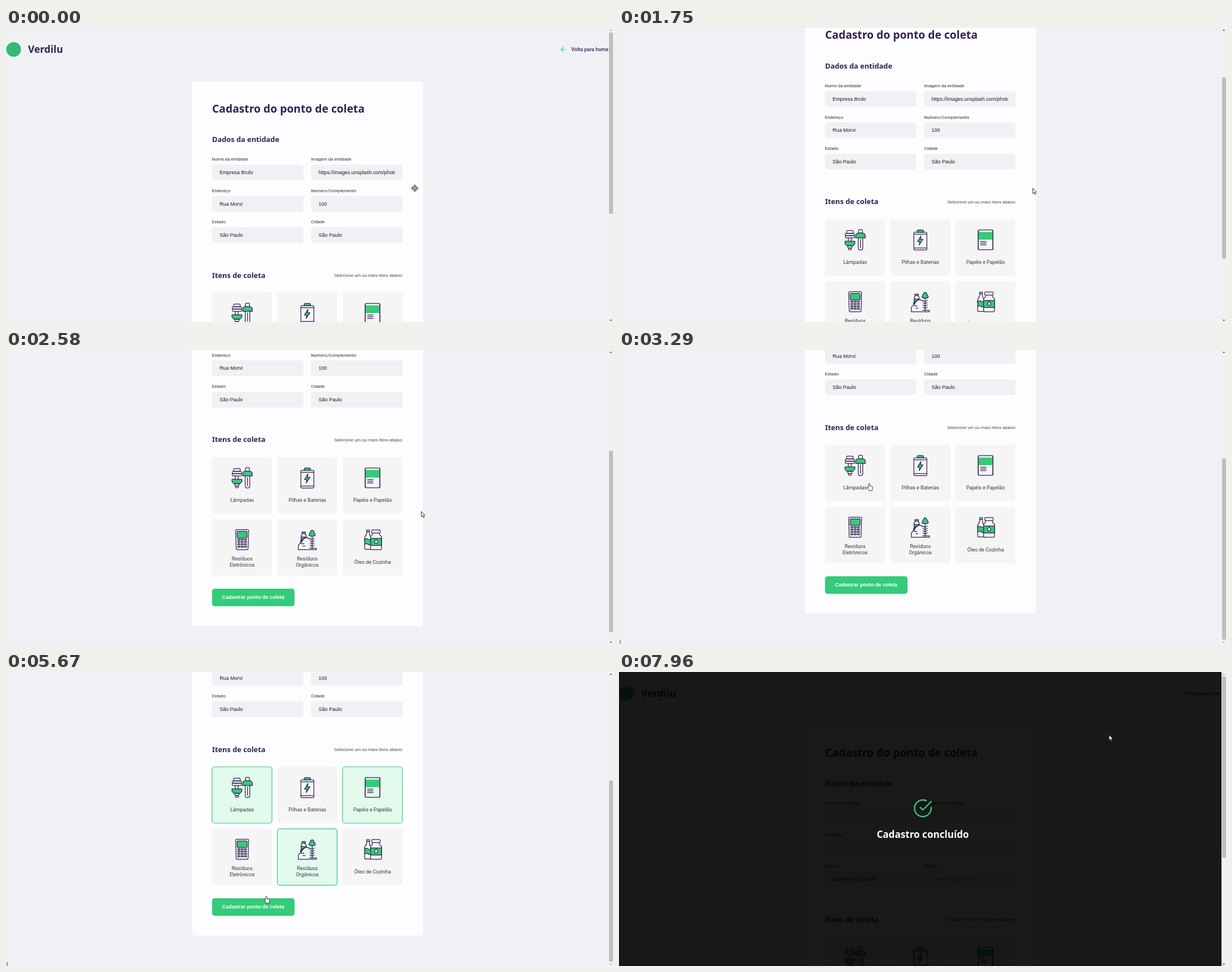
These frames come from a looping animation (1075 by 521 pixels, 8000 ms). An HTML page:

```html
<!DOCTYPE html>
<html lang="pt-BR">
<head>
<meta charset="utf-8">
<title>Cadastro do ponto de coleta</title>
<style>
html, body { margin: 0; height: 100%; overflow: hidden; background: #f0f1f5 }
svg { display: block; width: 100vw; height: 100vh }
text { font: 8.96px Roboto, sans-serif; fill: #3b3449 }
.head { font-family: "Noto Sans", sans-serif; font-weight: 700; fill: #322153 }
.label { font-size: 7.84px; fill: #2d2d34 }
.value { font-family: "Liberation Sans", Arial, sans-serif; fill: #1c1c20 }
.mid { text-anchor: middle }
.box { fill: #f0f1f4 }
.item { fill: #f5f5f5; stroke: none; stroke-width: 1.2 }
.item.on { fill: #e1faec; stroke: #42c483 }
.ico { fill: none; stroke: #322153; stroke-width: 1.25; stroke-linejoin: round; stroke-linecap: round }
.g { fill: #34cb79 }
.w { fill: #f5f5f5 }
.on + .ico .w { fill: #e1faec }
</style>
</head>
<body>
<svg viewBox="0 0 1075 521">
  <defs><clipPath id="clip"><rect x="553" y="240" width="136" height="32"/></clipPath></defs>
  <rect width="1075" height="521" fill="#f0f1f5"/>
  <g id="page">
    <circle cx="13.5" cy="38" r="13" fill="#34b878"/>
    <text class="head" x="39" y="44" style="font-size:17.4px">Verdilu</text>
    <path d="M992 38h-9m4.3-4.3L983 38l4.3 4.3" fill="none" stroke="#34cb79" stroke-width="1.2"/>
    <text x="1001" y="41" style="font-weight:500;fill:#322153">Volta para home</text>
    <rect x="329.5" y="95" width="409" height="673" rx="4.5" fill="#fdfdff"/>
    <text class="head" x="365" y="149.5" style="font-size:19.3px">Cadastro do ponto de coleta</text>
    <text class="head" x="365" y="202" style="font-size:12.8px">Dados da entidade</text>
    <g id="fields"></g>
    <text class="head" x="365" y="442.5" style="font-size:12.8px">Itens de coleta</text>
    <text class="label" x="702" y="441" text-anchor="end" style="fill:#4a4656">Selecione um ou mais itens abaixo</text>
    <g id="items"></g>
    <rect id="button" x="365" y="702" width="146" height="31" rx="4.5"/>
    <text class="value mid" x="437.7" y="720" style="font-weight:700;fill:#fff">Cadastrar ponto de coleta</text>
    <text x="0" y="821" style="font-family:'Liberation Serif',serif;fill:#000">}</text>
  </g>
  <g id="done">
    <rect width="1067" height="521" opacity=".9"/>
    <g transform="translate(520.4 223.9) scale(1.47)" fill="none" stroke="#34cb79" stroke-width="1.6" stroke-linecap="round" stroke-linejoin="round">
      <path d="M22 11.1V12a10 10 0 1 1-5.93-9.14M22 4L12 14l-3-3"/>
    </g>
    <text class="head mid" x="538" y="294" style="font-size:17.1px;fill:#fff">Cadastro concluído</text>
  </g>
  <rect x="1067" width="8" height="521" fill="#f1f1f1"/>
  <rect id="thumb" x="1068" width="7" height="321" fill="#bebebe"/>
  <path id="up" d="M1069 5l2.2-2.5 2.2 2.5z"/>
  <path id="down" d="M1069 517l2.2 2.5 2.2-2.5z"/>
  <g id="status">
    <path d="M0 521v-9.500h356q2 0 2 2v7.500z" fill="#f08abb"/>
    <text x="3" y="519.600" style="font:6.400px 'Open Sans',sans-serif;fill:#40202f">Aguardando localhost...</text>
  </g>
  <g id="cursor" stroke="#222" stroke-width=".9" fill="#fff" stroke-linejoin="round">
    <g id="pan"><path d="M0-6.500L2.500-3.500H-2.500zM0 6.500L2.500 3.500H-2.500zM-6.500 0L-3.500-2.500V2.500zM6.500 0L3.500-2.500V2.500z"/><path d="M0-4V4M-4 0H4"/><circle r="1.700"/></g>
    <path id="arrow" d="M0 0V9.500L2.200 7.500 3.800 11 5.300 10.300 3.800 7H6.600z"/>
    <path id="hand" d="M-1.200 7V1Q0-.8 1.200 1V4.500L5 5.300Q6.300 5.600 6.200 7L5.500 10V12.600H-.5V11.300L-3.600 7.600Q-3.600 5.700-1.200 7z"/>
  </g>
</svg>
<script>
const $ = id => document.getElementById(id);
const fields = [
  ["Nome da entidade", "Empresa Brulo", ""], ["Imagem da entidade", "https://images.unsplash.com/photo-", ""],
  ["Endereço", "Rua Morvi", ""], ["Número/Complemento", "100", ""],
  ["Estado", "São Paulo", "Selecione o Estado"], ["Cidade", "São Paulo", "Selecione a Cidade"]
];
$("fields").innerHTML = fields.map(([label, value], i) => {
  const x = 364.8 + i % 2 * 175.4, y = 242 + (i >> 1) * 55.5;
  return `<text class="label" x="${x}" y="${y - 6.7}">${label}</text>
    <rect class="box" x="${x}" y="${y}" width="162" height="28" rx="4.5"/>
    <g${i == 1 ? ' clip-path="url(#clip)"' : ""}><text class="value" x="${x + 13.4}" y="${y + 17}">${value}</text></g>`;
}).join("");

const path = (d, c = "") => `<path class="${c}" d="${d}"/>`;
const rect = (x, y, w, h, c = "", r = 1.5) => `<rect class="${c}" x="${x}" y="${y}" width="${w}" height="${h}" rx="${r}"/>`;
let keys = "";
for (let k = 0; k < 12; k++) keys += rect(-7.8 + k % 3 * 5.8, -1.4 + (k / 3 | 0) * 4.2, 4, 2, "", .8);
let ribs = "";
for (let y = 0; y < 16; y += 4) ribs += `M4.800 ${y - 2.5}L8.500 ${y}l3.700-2.500`;

const items = [
  ["Lâmpadas",
    rect(-15, -16.5, 11.5, 5) + rect(-17.5, -11.5, 16.5, 4) + rect(-17.5, -7.5, 16.5, 4) + path("M-12-3.500v6M-7-3.500v6")
    + path("M-18 2.500h17.500v4l-3.500 4h-10.500l-3.500-4z", "g") + rect(-13, 10.5, 7.5, 4) + rect(-12, 14.5, 5.5, 3)
    + rect(6, -18, 7, 6) + path("M1-3.500v-3q0-5.500 5.500-5.500h6q5.500 0 5.500 5.500v3z", "g")
    + path("M5.500-3.500V15q0 3 4 3t4-3V-3.500M9.500-1V14")],
  ["Pilhas e Baterias",
    rect(-11.5, -13.5, 23, 31.5, "", 2) + path("M-5.500-13.500v-2q0-2 2-2h7q2 0 2 2v2z", "g")
    + path("M-11.500-10h23M-11.500 14.500h23") + path("M1-7L-5 3h4l-1 6 6.500-10h-4.200z", "g")],
  ["Papéis e Papelão",
    rect(-13, -17.5, 26, 35, "", 2) + `<rect class="g" x="-13" y="-14" width="26" height="13.500" stroke="none"/>`
    + path("M-13-17V17M13-17V17M-9 3h10M-9 6h10M-9 9h10")],
  ["Resíduos|Eletrônicos",
    path("M-9.500-18h19q2 0 2 2L10.500 15.500q0 2-2 2h-17q-2 0-2-2L-11.500-16q0-2 2-2z") + rect(-8.8, -15, 17.6, 11.5, "g") + keys],
  ["Resíduos|Orgânicos",
    path("M-11-3v-4q0-2 2.500-3.500V-12h4v1.500Q-2-9-2-7V-4") + rect(-10, -14, 7, 2.5)
    + path("M-11-5h9l-6 5-3 5z", "g")
    + path("M-16 17.500V11q1-4 4-5v-4q2-3 6-4l4-2q4 0 6 3M-11 7h5M-8 11h4M-16 17.500H16V15H4") + path("M8.500-17q2 0 3.500 4 3 4 1.500 5.500-1 1-5 1t-5-1Q2-9 5-13q1.500-4 3.500-4z", "g")
    + path("M8.500-6V16" + ribs)],
  ["Óleo de Cozinha",
    rect(-11, -17.5, 6, 3) + path("M-10-14.500q0 5-3 8.500-2 3-1 7t0 7v7q0 2 2 2H-3V-4q-3-5-3-10.500z")
    + path("M-14-1q3-2 6 0t5 0V8q-3 2-5 0t-6 0z", "g")
    + path("M0-12h12q0 4 4 6.500V15q0 2.500-2.500 2.500H-1q-2.500 0-2.500-2.500V-5.500Q0-8 0-12z", "w") + rect(-1.5, -17.5, 15, 5.5, "w")
    + path("M-3.500-2.500H16V10H-3.500z", "g") + path("M6.300-1q3 3.500 3 5t-3 2.500q-3-.8-3-2.500t3-5z", "w")]
];
$("items").innerHTML = items.map(([name, icon], i) => {
  const x = 365 + i % 3 * 115.5, y = 469 + (i / 3 | 0) * 109.8, cx = x + 53.2, lines = name.split("|");
  const first = lines.length > 1 ? 73.5 : 79;
  return `<rect class="item" x="${x}" y="${y}" width="106" height="100" rx="4.5"/>
    <g class="ico" transform="translate(${cx} ${y + 36.6})">${icon}</g>`
    + lines.map((s, n) => `<text class="mid" x="${cx}" y="${y + first + n * 10.6}">${s}</text>`).join("");
}).join("");

// Keyframes are [time, ...values], linear in between.
const scrollKeys = [[130, 0], [500, 18], [1040, 56], [1330, 56], [2250, 218], [2700, 301]];
const cursorKeys = [
  [1249, 724, 284], [1250, 730, 282], [2250, 735.5, 286], [2650, 735.5, 286], [2960, 690, 280], [3290, 443, 236.5],
  [3700, 443, 236.5], [4130, 530, 325], [4330, 530, 325], [4670, 613, 254], [4850, 635, 235], [5100, 635, 235],
  [5420, 497, 360], [5750, 449.5, 409], [7080, 449.5, 409], [7500, 640, 300], [7920, 868, 139], [7960, 868, 111.5]
];
function at(list, t) {
  const i = list.findIndex(k => k[0] > t);
  if (i == 0) return list[0].slice(1);
  if (i < 0) return list[list.length - 1].slice(1);
  const a = list[i - 1], b = list[i], u = (t - a[0]) / (b[0] - a[0]);
  return a.slice(1).map((v, n) => v + (b[n + 1] - v) * u);
}

const cards = document.querySelectorAll(".item"), values = document.querySelectorAll("#fields .value");
const picks = { 0: 3500, 4: 4230, 2: 4980 };
const show = (id, on) => $(id).style.display = on ? "" : "none";
const set = (id, attrs) => { for (const k in attrs) $(id).setAttribute(k, attrs[k]); };

function draw(t) {
  const done = t >= 6900, scroll = done ? 0 : at(scrollKeys, t)[0];
  set("page", { transform: `translate(0 ${-scroll})` });
  set("thumb", { y: 8 + scroll * .612 });
  set("up", { fill: scroll > 0 ? "#505050" : "#a3a3a3" });
  set("down", { fill: scroll < 301 ? "#505050" : "#a3a3a3" });

  cards.forEach((c, i) => c.classList.toggle("on", !done && t >= picks[i]));
  values.forEach((v, i) => v.textContent = fields[i][done ? 2 : 1]);
  values[5].style.opacity = done ? .5 : 1;

  const focus = t >= 6050 && !done;
  set("button", {
    fill: t >= 5740 && !done ? "#2fb86e" : "#34cb79",
    stroke: focus ? "#101010" : "none", "stroke-width": 1.2, rx: focus ? 2 : 4.5
  });
  show("done", done);
  show("status", t >= 6200 && t < 7180);

  const [x, y] = at(cursorKeys, t), hand = t >= 3120 && t < 6250;
  set("cursor", { transform: `translate(${x} ${y})` });
  show("pan", t < 1250);
  show("hand", hand);
  show("arrow", t >= 1250 && !hand);
}
const start = performance.now();
function tick() {
  draw((performance.now() - start) % 8000);
  requestAnimationFrame(tick);
}
tick();
</script>
</body>
</html>
```
